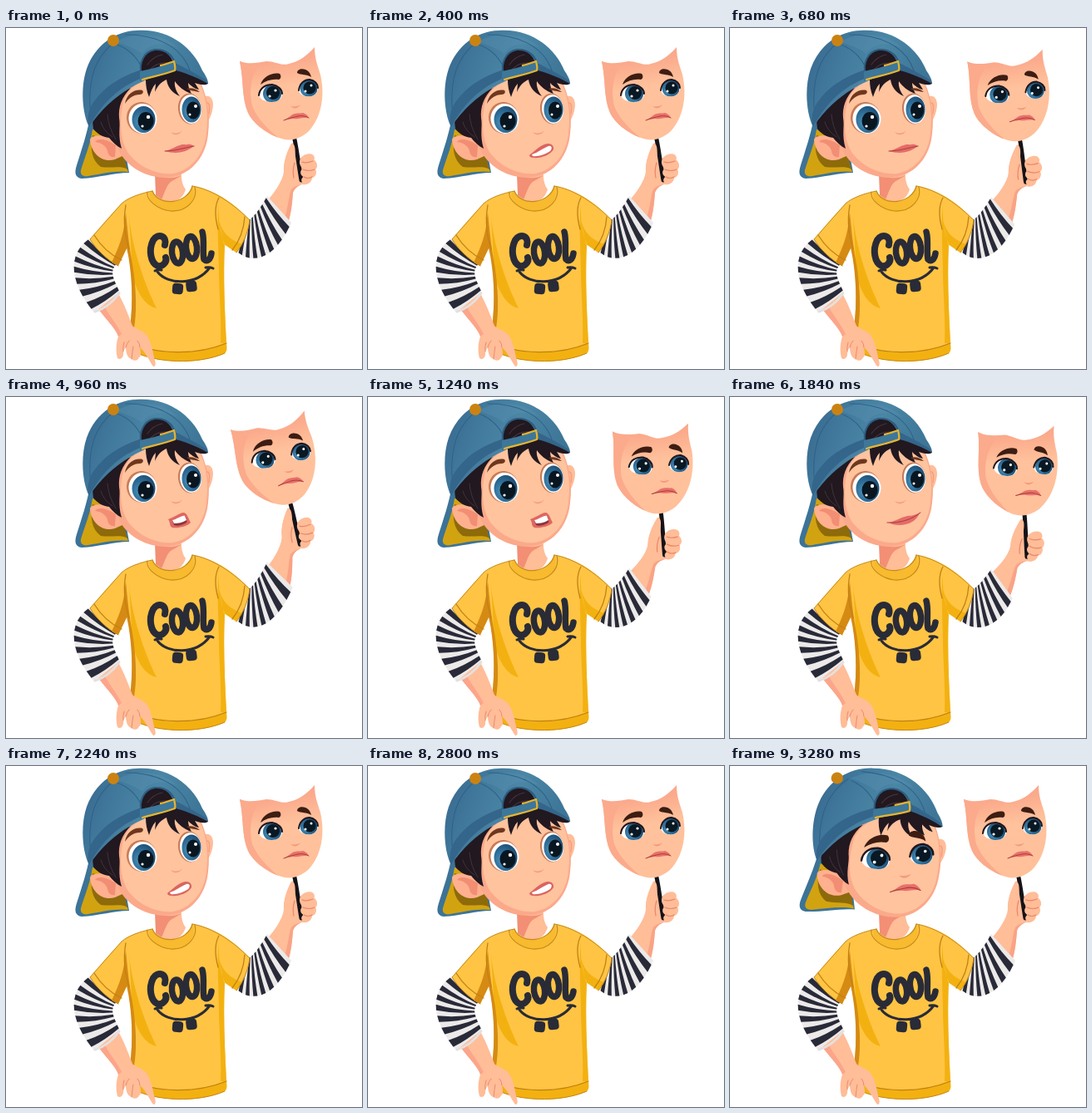
An HTML page for the animation above (4000 ms loop, 428x410 px).

```html
<!DOCTYPE html>
<html lang="en">
<head>
<meta charset="utf-8">
<title>Boy with a mask</title>
<style>
html, body { margin: 0; width: 100%; height: 100%; overflow: hidden; background: #fff; }
svg { display: block; width: 100vw; height: 100vh; }
.line { fill: none; stroke-linecap: round; stroke-linejoin: round; }
</style>
</head>
<body>
<svg viewBox="0 0 428 410" xmlns="http://www.w3.org/2000/svg">
<defs>
  <linearGradient id="maskSkin" x1="0" y1="0" x2=".15" y2="1">
    <stop offset="0" stop-color="#fba388"/><stop offset=".22" stop-color="#fbaa8c"/><stop offset=".5" stop-color="#ffc29c"/><stop offset="1" stop-color="#ffc09a"/>
  </linearGradient>
  <linearGradient id="dome" x1="0" y1="0" x2="1" y2=".3">
    <stop offset="0" stop-color="#36658d"/><stop offset=".3" stop-color="#40789b"/><stop offset=".6" stop-color="#4b86a5"/><stop offset="1" stop-color="#3d7596"/>
  </linearGradient>
  <radialGradient id="iris" cx=".35" cy=".6" r=".7">
    <stop offset="0" stop-color="#4e96bf"/><stop offset=".5" stop-color="#2f6e99"/><stop offset="1" stop-color="#1b4a70"/>
  </radialGradient>
  <clipPath id="eyeL"><path d="M304 81C305 72 312 68 320 68C328 69 333 75 332 81C330 89 320 90 313 88C308 87 305 84 304 81Z"/></clipPath>
  <clipPath id="eyeR"><path d="M352 75C353 66 359 62 365 62C372 63 375 68 375 74C373 82 366 83 360 82C356 81 353 79 352 75Z"/></clipPath>
  <g id="sad">
    <path fill="#3d1d12" d="M306 68C309 58 321 53 329 55C331 57 331 61 328 62C320 61 313 63 306 68ZM350 54C350 50 355 48 360 50C363 51 366 54 367 59C361 55 355 57 350 54Z"/>
    <g clip-path="url(#eyeL)"><path fill="#fff" d="M300 65h35v30h-35z"/><circle cx="320" cy="79" r="11" fill="url(#iris)"/><circle cx="321" cy="78" r="8" fill="#091822"/></g>
    <g clip-path="url(#eyeR)"><path fill="#fff" d="M350 60h30v30h-30z"/><circle cx="364" cy="72.5" r="10.5" fill="url(#iris)"/><circle cx="365" cy="72" r="7.6" fill="#091822"/></g>
    <path class="line" stroke="#21151a" stroke-width="2" d="M304 81C305 72 312 68 320 68C327 69 332 74 332 79M352 75C353 66 359 62 365 62C371 63 375 67 375 72"/>
    <g fill="#fff"><circle cx="317" cy="82" r="1.6"/><circle cx="324" cy="75" r="1.6"/><circle cx="360" cy="76" r="1.5"/><circle cx="367" cy="69" r="1.5"/></g>
    <path fill="#f39a7e" d="M342 94C346 98 351 97 354 92C352 94 346 95 342 94Z"/>
    <path fill="#e8706a" d="M334 111C340 108 344 103 348 103C351 102 354 103 357 102C360 103 363 105 364 108C357 107 351 110 346 109C342 109 338 110 334 111Z"/>
    <path class="line" stroke="#a93e3c" stroke-width="1" d="M334 111C341 108 347 107 351 106C356 105 360 106 364 108"/>
  </g>
</defs>

<!-- raised arm -->
<g id="hand">
  <path fill="#ffbd98" d="M308 214C322 200 333 184 334 172C334 158 339 147 343 139C349 136 352 148 350 160L358 153C366 149 372 152 370 158C375 162 375 167 372 170C374 175 372 179 368 180C367 187 361 189 356 188C350 190 347 193 345 198C344 211 343 222 339 235Z"/>
  <path fill="#f9a386" d="M336 225C340 211 340 201 343 194C347 190 351 189 356 188C350 190 347 193 345 198C344 211 343 222 339 235Z"/>
  <path class="line" stroke="#151318" stroke-width="5" d="M347 134C350 148 352 166 355 183"/>
  <path fill="#ffbd98" d="M334 173C333 160 339 147 343 139C349 138 348 151 347 162C349 172 352 182 349 187Z"/>
  <path fill="#ffbd98" d="M355 156C361 150 371 151 371 157C370 160 367 161 365 161C373 159 376 166 372 170C374 174 372 179 368 180C367 187 361 189 357 186C354 184 355 180 358 179C353 177 353 171 357 169C352 165 352 159 355 156Z"/>
  <path class="line" stroke="#ea8568" stroke-width="1.2" d="M356 161Q361 163 369 160M357 170Q364 173 371 170M358 179Q363 182 368 179M347 162Q344 171 346 180"/>
  <path fill="url(#maskSkin)" d="M281 40C291 44 303 42 313 40C324 40 331 46 340 43C353 40 361 34 371 23C371 37 375 46 378 56C384 82 379 108 364 124C353 134 341 137 328 132C311 126 296 113 291 102C283 84 286 62 281 40Z"/>
  <path fill="#fbaa8c" d="M281 40C286 62 283 84 291 102C296 113 311 126 328 132C316 123 302 109 296 94C292 76 294 60 302 48Z"/>
  <use href="#sad"/>
</g>
<path id="sleeve" fill="#ece9e9"/>
<path id="bands" fill="#292a38"/>

<!-- shirt -->
<path id="sleeve2" fill="#ece9e9"/>
<path id="bands2" fill="#292a38"/>
<path fill="#ffbd98" d="M180 169V201C187 215 211 213 216 194C212 189 210 181 211 168Z"/>
<path fill="#f28f75" d="M179 176C188 181 200 182 211 177C205 182 199 183 196 187C192 192 190 200 187 206L180 201Z"/>
<path fill="#ffc443" d="M176 196C161 199 147 204 139 211C125 225 113 240 101 254C109 267 122 279 135 286L146 263C152 295 153 330 149 361L148 386C176 404 232 405 263 391C266 388 266 384 265 379C263 340 261 298 263 260L277 270C285 260 291 246 293 231C281 218 268 207 254 200C243 194 234 192 224 190C219 211 184 216 176 196Z"/>
<path fill="#f3b111" d="M148 226C151 262 166 307 181 337C167 334 157 318 152 296ZM256 212C253 240 256 270 256 300C257 330 259 355 258 379L265 379C263 340 261 298 263 260C258 248 255 231 256 212ZM256 231C260 246 268 254 284 260L277 270L262 260ZM149 378C178 394 229 394 265 378L265 384C266 388 264 391 261 392C232 405 176 404 148 386Z"/>
<path fill="#d58a14" d="M144 222C141 240 142 253 145 264C152 295 153 330 149 361L149 378C159 356 157 314 152 284C148 263 146 242 144 222ZM143 229C142 247 136 263 127 282L135 286L146 263Z"/>
<path class="line" stroke="#c08115" stroke-width="1.3" d="M106 249C114 262 126 273 139 279M287 227C286 242 280 257 272 267M148 377C178 393 229 394 265 379M256 204C250 215 252 231 255 242M144 213C140 235 144 252 148 266"/>
<path fill="#f8ba2e" d="M176 196C166 199 176 216 196 220C217 223 231 207 224 190C219 211 184 216 176 196Z"/>
<path class="line" stroke="#c58a19" stroke-width="1.2" d="M170 197C168 206 181 218 198 220C217 221 231 207 227 191M176 196C184 216 219 211 224 190"/>
<path class="line" stroke="#c48817" stroke-width="1" d="M135 286C122 279 109 267 101 254L139 211C147 204 161 199 176 196M224 190C243 193 268 206 293 231C291 246 285 260 277 270M148 386C176 404 232 405 263 391"/>

<!-- shirt lettering -->
<g class="line" stroke="#292b37">
  <path stroke-width="8" d="M191 261C194 250 183 246 177 255C171 267 174 282 182 286C188 288 194 281 192 276"/>
  <ellipse cx="206" cy="270" rx="6.5" ry="13" stroke-width="7.5" transform="rotate(-7 206 270)"/>
  <ellipse cx="223" cy="264" rx="6.5" ry="13.5" stroke-width="7.5" transform="rotate(-6 223 264)"/>
  <path stroke-width="7.5" d="M236 245C239 255 236 270 238 278C242 282 246 278 247 271"/>
  <path stroke-width="3" d="M182 293C194 309 229 310 245 288M179 292Q182 290 187 291M240 288Q245 287 249 289"/>
</g>
<g fill="#292b37"><rect x="200" y="307" width="13" height="13" rx="4" transform="rotate(5 207 313)"/><rect x="216.500" y="304" width="13" height="13" rx="4" transform="rotate(-7 223 311)"/></g>

<!-- lowered forearm -->
<path fill="#ffbd98" d="M111 338C122 352 133 363 135 371C132 380 132 389 134 397C138 400 142 396 141 389L144 384C144 390 146 397 151 398C154 401 159 400 160 396C163 395 162 389 161 384C168 390 172 400 177 407C181 407 180 402 178 396C176 385 173 374 168 368C161 362 154 361 152 358C147 345 143 334 135 319Z"/>
<path fill="#fba58a" d="M111 338C122 352 133 363 135 371L139 368C134 357 125 347 119 336Z"/>
<path class="line" stroke="#ea8b70" stroke-width="1" d="M144 384Q145 379 148 376M151 398Q152 388 153 383M161 384Q161 379 158 376M141 389Q140 384 142 378"/>
<path id="cuff2" class="line" stroke="#e4e0df" stroke-width="3" d="M107 341Q124 336 136 319"/>

<!-- head -->
<g id="head">
  <path fill="#3c7397" d="M100 112C97 128 91 146 85 165C82 174 83 180 91 181C112 180 129 174 148 174L139 124Z"/>
  <path fill="#d2a310" d="M104 122C101 142 94 157 90 171C89 177 93 179 99 178C116 175 133 171 147 173C141 157 134 147 128 129Z"/>
  <path fill="#8d6a0a" d="M104 129C101 145 103 159 114 167C126 169 139 165 146 170L138 139Z"/>
  <path fill="#ffbd98" d="M236 84C243 79 249 83 249 93C248 103 245 111 239 115Z"/>
  <path class="line" stroke="#f39d80" stroke-width="1.4" d="M241 90Q246 89 244 103"/>
  <path fill="#ffb08e" d="M137 136C123 128 104 127 101 134C102 150 115 163 131 158L142 153Z"/>
  <path fill="#f28e73" d="M132 141C121 133 110 132 107 137C115 138 121 142 122 148C123 153 126 156 131 155Z"/>
  <path fill="#fba98b" d="M134 84C129 110 129 134 137 150C149 171 176 183 200 179C224 175 241 153 243 127C246 105 242 78 230 58L166 53Z"/>
  <path fill="#ffc39e" d="M141 88C136 112 137 134 146 149C158 166 180 177 201 175C223 171 239 151 241 126C244 105 241 78 229 60L175 58C160 64 147 73 141 88Z"/>
  <path fill="#211820" d="M104 112C112 94 122 83 137 76L150 72C139 83 135 95 136 108C138 119 134 128 139 145C133 142 128 137 124 132C116 131 109 127 105 121Z"/>
  <path class="line" stroke="#443239" stroke-width="1" d="M114 113Q117 124 128 131M122 104Q123 119 132 134"/>
  <path fill="url(#dome)" d="M100 119C92 104 89 72 97 49C107 21 130 4 157 3C196 0 225 24 236 51C240 57 243 62 243 67C231 64 216 57 203 51C167 60 128 77 100 119Z"/>
  <path fill="#5790ae" d="M132 17C151 5 185 3 207 24C190 16 172 18 164 31C159 27 150 22 132 17Z" opacity=".4"/>
  <path fill="#34658a" d="M100 119C97 112 98 101 104 91C120 67 143 57 163 50L164 60C137 70 115 90 100 119ZM203 42C216 48 230 56 240 62L243 67C231 64 216 57 203 51Z"/>
  <path class="line" stroke="#30628a" stroke-width="1.1" d="M129 18C108 35 99 59 101 96M133 20C148 25 157 35 163 47M144 8C178 8 210 20 221 51"/>
  <path fill="#211820" d="M163 58C159 43 166 28 179 26C191 25 201 34 203 49Z"/>
  <path class="line" stroke="#2d5c80" stroke-width="2" d="M163 56C159 42 166 28 179 26C191 25 200 32 203 42"/>
  <path class="line" stroke="#463139" stroke-width="1.2" d="M170 44Q177 34 188 32M174 49Q182 41 195 42"/>
  <path fill="#211820" d="M168 62L204 51C219 55 232 61 243 67C238 70 231 67 227 66L232 74C226 73 222 69 219 66C219 71 221 75 223 79C214 76 207 70 203 64C202 70 205 77 209 82C199 78 194 70 193 62C186 65 182 70 179 77L180 67C176 71 174 77 172 83C169 76 168 69 168 62Z"/>
  <path fill="#3d7799" d="M161 52C177 49 190 45 202 40L204 51C188 57 176 59 161 64Z"/>
  <path class="line" stroke="#e4b431" stroke-width="2.3" d="M164 62C177 58 190 56 203 51C204 48 203 44 202 40C196 42 191 44 186 45"/>
  <circle id="button" cx="129" cy="15" r="7" fill="#ca8312"/>

  <g id="awake">
    <path fill="#6f371d" d="M143 91C145 79 155 73 164 75C166 77 164 80 161 80C153 80 148 84 143 91ZM217 73C222 71 229 73 233 77C228 76 222 76 217 73Z"/>
    <ellipse cx="163" cy="108" rx="18" ry="19" fill="#c97b55" transform="rotate(-8 163 108)"/>
    <ellipse cx="164.500" cy="109" rx="17" ry="18" fill="#fff" transform="rotate(-8 164 109)"/>
    <ellipse cx="165.500" cy="110" rx="14" ry="16" fill="url(#iris)"/><ellipse cx="168" cy="112" rx="9.500" ry="11" fill="#091620"/>
    <ellipse cx="221" cy="97" rx="14" ry="18.500" fill="#c97b55" transform="rotate(-7 221 97)"/>
    <ellipse cx="222" cy="97.500" rx="13" ry="17.500" fill="#fff" transform="rotate(-7 222 97)"/>
    <ellipse cx="223" cy="98" rx="11.500" ry="15.500" fill="url(#iris)"/><ellipse cx="225" cy="99" rx="8" ry="10.500" fill="#091620"/>
    <g fill="#fff"><circle cx="164" cy="118" r="1.6"/><circle cx="171" cy="107" r="2.2"/><circle cx="221" cy="104" r="1.5"/><circle cx="228" cy="94" r="2"/></g>
    <path fill="#f59b80" d="M198 125C202 130 209 129 212 123C210 126 204 128 198 125Z"/>
    <g id="mouth">
      <g><path fill="#e56c67" d="M191 148C199 146 204 142 209 141C213 139 215 141 218 140C222 139 224 141 226 142C220 147 211 150 204 150C199 150 195 149 191 148Z"/><path class="line" stroke="#a73d40" stroke-width="1" d="M191 148C203 148 214 144 226 142"/></g>
      <g><path fill="#e56c67" d="M191 151C199 149 205 145 210 144C214 142 220 144 228 139C225 149 214 154 204 154C198 154 194 153 191 151Z"/><path class="line" stroke="#a73d40" stroke-width="1" d="M189 151C205 152 219 147 229 139"/></g>
      <g><path fill="#dc645f" d="M194 153C200 148 206 142 212 140C219 137 224 141 223 146C219 153 207 157 199 156C196 156 194 155 194 153Z"/><path fill="#fff" d="M197 152C204 150 211 144 217 142C221 141 222 145 219 148C213 152 204 155 198 154Z"/></g>
      <g><path fill="#e0665f" d="M195 147C202 145 207 140 213 139C218 139 219 146 222 151C217 156 207 158 200 157C196 155 198 151 195 147Z"/><path fill="#8d343b" d="M200 148C206 147 211 143 215 143C217 146 218 149 217 151C212 154 206 156 202 154Z"/><path fill="#fff" d="M200 148C206 147 211 142 215 143L217 148C212 151 207 152 202 152Z"/></g>
      <g><path fill="#e0665f" d="M195 148C199 141 206 134 213 134C221 136 223 144 221 151C217 158 208 162 201 160C196 158 194 153 195 148Z"/><path fill="#8d343b" d="M199 149C203 143 208 138 213 138C218 140 219 145 217 150C213 156 207 158 202 156C199 154 198 152 199 149Z"/><path fill="#fff" d="M201 146C204 142 209 138 213 138C216 139 217 141 218 143C212 145 206 147 201 146Z"/></g>
    </g>
  </g>
</g>
<use id="sulk" href="#sad" transform="translate(175 112) rotate(2.5) scale(1.21) translate(-318 -79)"/>
</svg>
<script>
const $ = id => document.getElementById(id);
const LOOP = 4000, STEP = 40;
const pivot = [281, 178];
const drift = [0.48, 0.25];

// the arm swings left first, then to and fro, eight steps from rest to rest
const FIRST = 6, LAST = 46, END = 53, HALF = 8;
const LEFT = 7.6, RIGHT = 6;

// one mouth shape per 80 ms: closed, smile, teeth, open, wide open
const speech = "02321232023231232123202121332224413220";

function tiltAt(n) {
  if (n <= 1 || n >= END) return 0;
  if (n < FIRST) return -LEFT * (n - 1) / (FIRST - 1);
  if (n > LAST) return RIGHT * (END - n) / (END - LAST);
  const phase = (n - FIRST) % (2 * HALF) / HALF;
  const wave = 1 - 2 * Math.abs(1 - phase);
  return wave * (wave < 0 ? LEFT : RIGHT);
}

function tilted([x, y], deg) {
  const a = deg * Math.PI / 180, c = Math.cos(a), s = Math.sin(a);
  const dx = x - pivot[0], dy = y - pivot[1];
  return [pivot[0] + dx * c - dy * s + drift[0] * deg,
          pivot[1] + dx * s + dy * c + drift[1] * deg];
}

const onCurve = (p, t) => [0, 1].map(k => {
  const u = 1 - t;
  return u * u * u * p[0][k] + 3 * u * u * t * p[1][k] + 3 * u * t * t * p[2][k] + t * t * t * p[3][k];
});

// striped cloth between an inner and an outer edge
function drawSleeve(cloth, bands, inner, outer, count, bulge) {
  const strip = (from, to) => {
    const a = onCurve(inner, from), b = onCurve(outer, from);
    const c = onCurve(outer, to), d = onCurve(inner, to);
    const bow = (p, q) => [(p[0] + q[0]) / 2 + bulge[0], (p[1] + q[1]) / 2 + bulge[1]];
    return `M${a}Q${bow(a, b)} ${b}L${c}Q${bow(c, d)} ${d}Z`;
  };
  const [i0, i1, i2, i3] = inner, [o0, o1, o2, o3] = outer;
  cloth.setAttribute("d", `M${i0}C${i1} ${i2} ${i3}L${o3}C${o2} ${o1} ${o0}Z`);
  let d = "";
  for (let i = 0; i < count; i++) d += strip((i + 0.2) / count, (i + 0.72) / count);
  bands.setAttribute("d", d);
}

drawSleeve($("sleeve2"), $("bands2"),
  [[133, 283], [126, 292], [126, 296], [137, 318]],
  [[101, 253], [73, 271], [76, 306], [106, 342]], 7, [0, 3]);

function draw(time) {
  const t = time % LOOP, n = Math.floor(t / STEP);
  const tilt = tiltAt(n), move = p => tilted(p, tilt);

  $("hand").setAttribute("transform",
    `translate(${drift[0] * tilt} ${drift[1] * tilt}) rotate(${tilt} ${pivot})`);
  drawSleeve($("sleeve"), $("bands"),
    [[290, 232], [294, 231], move([303, 222]), move([314, 202])],
    [[278, 269], [296, 285], [324, 278], move([343, 234])], 7, [-1, 2]);

  const turn = Math.min(1, Math.max(0, (n - 78) / 4));
  $("head").setAttribute("transform",
    `rotate(${4.3 * turn} 170 178) translate(95 0) scale(${1 + 0.03 * turn} 1) translate(-95 0)`);
  $("button").setAttribute("transform", `translate(${-13 * turn} ${3 * turn})`);

  const sulking = turn >= 0.5;
  $("awake").style.display = sulking ? "none" : "";
  $("sulk").style.display = sulking ? "" : "none";
  const shape = +(speech[Math.floor(t / 80)] || 0);
  [...$("mouth").children].forEach((g, i) => { g.style.display = i === shape ? "" : "none"; });
}

const start = performance.now();
function tick() {
  draw(performance.now() - start);
  requestAnimationFrame(tick);
}
tick();
</script>
</body>
</html>
```
